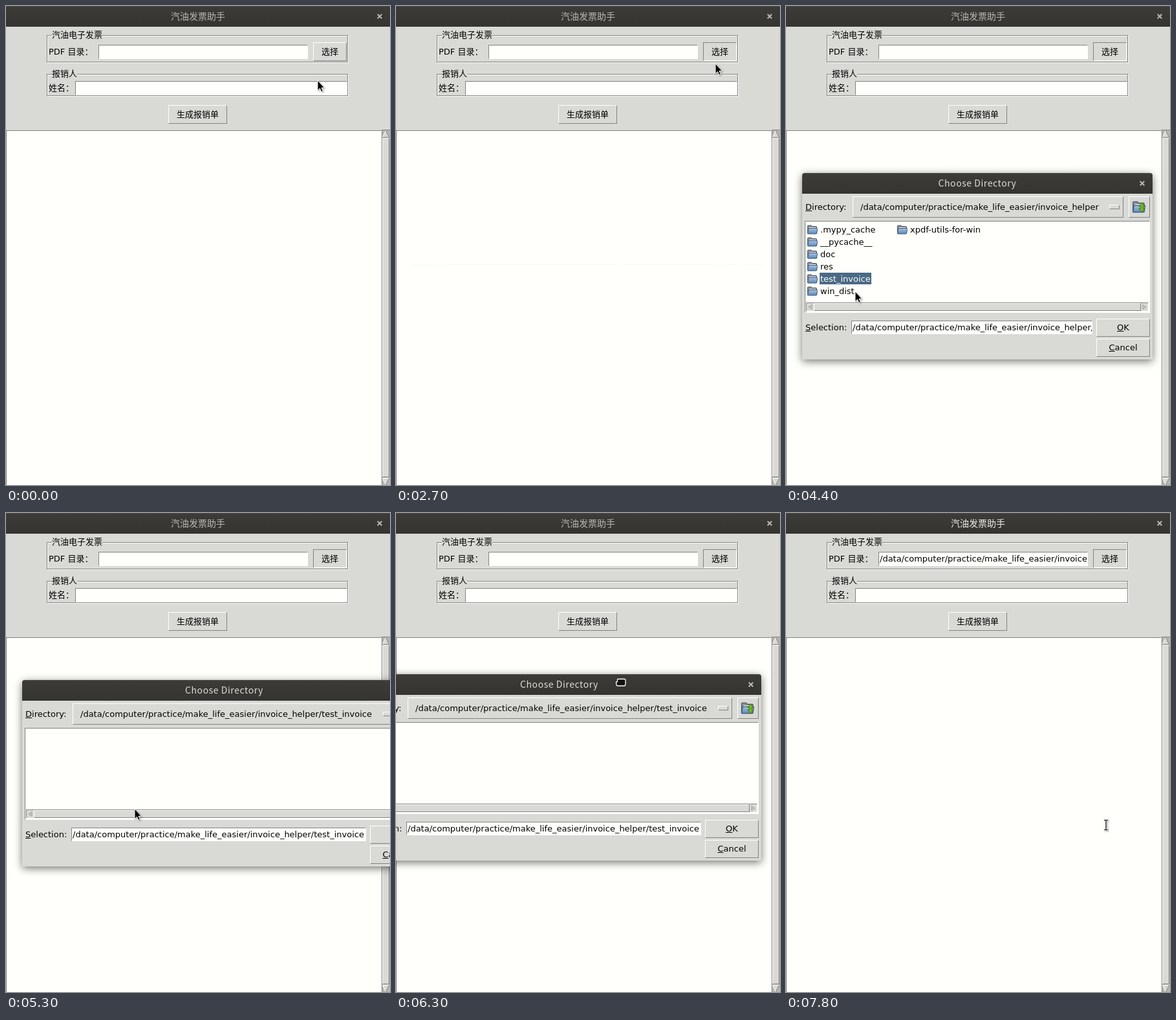
An HTML page for the animation above (8 s loop, 594 by 740 pixels).

```html
<!DOCTYPE html>
<html lang="zh">
<head>
<meta charset="utf-8">
<title>汽油发票助手</title>
<style>
:root { --face: #d9d9d5; --paper: #fffffb; --dark: #838380; --pick: #4a6984; }
html, body { margin: 0; width: 100%; height: 100%; overflow: hidden; }
body { position: relative; background: var(--face); color: #000;
  font: 13px/19px "DejaVu Sans", "Noto Sans CJK SC", "Noto Sans CJK", sans-serif; }
div, svg, .t { position: absolute; box-sizing: border-box; white-space: pre; }
svg { overflow: visible; }

/* widgets */
.bar { left: 0; right: 0; top: 0; height: 32px; text-align: center; color: #dfdcd5;
  font: 14px/30px "Noto Sans CJK SC", "Noto Sans CJK", "Noto Sans", sans-serif;
  background: linear-gradient(#4a4944, #3c3b37 2px, #353431); }
.bar svg { right: 12px; top: 12px; width: 8px; height: 8px; stroke: #b9b7b0; stroke-width: 2; }
.group { left: 63px; width: 466px; border: 1px solid var(--dark);
  box-shadow: 1px 1px #fff, inset 1px 1px #fff; }
.legend { left: 71px; background: var(--face); }
.raised { background: var(--face); border: 1px solid; border-color: #fff var(--dark) var(--dark) #fff; }
.sunken { background: var(--paper); border: 1px solid; border-color: var(--dark) #fff #fff var(--dark); overflow: hidden; }
.btn { text-align: center; line-height: 27px; }
.trough { background: #b5b5b1; border: 1px solid; border-color: var(--dark) #fff #fff var(--dark); }
.entry span { display: inline-block; height: 19px; padding: 0 1px; }

/* dialog */
#dialog { left: 25px; top: 258px; width: 542px; height: 288px; background: var(--face);
  border-radius: 4px 4px 0 0; box-shadow: 0 3px 13px rgba(0, 0, 0, .55); }
#dialog .bar { border-radius: 4px 4px 0 0; letter-spacing: .55px; }
.row { left: 8px; height: 19px; }
.row svg { left: 0; top: 2px; width: 16px; height: 15px; }
.row span { position: absolute; left: 19px; top: 0; padding: 0 1px; height: 18px; }

/* motion: every change is a hard step */
#main, .pick, .pathsel, .suffix, .files, #browse, #ok, #dialog, #field, #pointer, #pointer > svg {
  animation: 8s step-end infinite; }
#main { animation-name: focus; }
#field { animation-name: filled; }
#browse { animation-name: browse; }
#ok { animation-name: ok; }
#dialog { animation-name: dialog, widen; }
.pick { animation-name: pick; }
.pathsel { animation-name: pathsel; }
.suffix { animation-name: suffix; }
.files { animation-name: files; }
#pointer { animation-name: move; }
#pointer > .arrow { animation-name: arrow; }
#pointer > .grab { animation-name: grab; }
#pointer > .beam { animation-name: filled; }

@keyframes focus { 0% { color: #b9b7b0 } 95%, 100% { color: #efede8 } }
@keyframes filled { 0% { opacity: 0 } 95%, 100% { opacity: 1 } }
@keyframes browse {
  0% { background: #d9d9d5 }
  28.75% { background: #ececea }
  32.5% { background: #ececea; border-color: #838380 #fff #fff #838380 }
  33.75%, 100% { background: #d9d9d5 }
}
@keyframes ok { 0% { background: #d9d9d5 } 91.25%, 100% { background: #ececea } }
@keyframes pick { 0% { background: none; color: #000 } 55%, 100% { background: #4a6984; color: #fff } }
@keyframes pathsel { 0% { background: #4a6984; color: #fff } 55%, 100% { background: none; color: #000 } }
@keyframes suffix { 0% { opacity: 0 } 60%, 100% { opacity: 1 } }
@keyframes files { 0% { opacity: 1 } 60%, 100% { opacity: 0 } }
@keyframes widen { 0% { width: 542px } 60%, 100% { width: 625px } }
@keyframes dialog {
  0% { opacity: 0; transform: none }
  33.75% { opacity: .03; transform: scaleY(.02) }
  35% { opacity: .5; transform: scaleY(.55) }
  36.25% { opacity: 1; transform: none }
  76.25% { opacity: 1; transform: translate(-9px, 5px) }
  77.5% { opacity: 1; transform: translate(-45px, 0) }
  78.75% { opacity: 1; transform: translate(-85px, -9px) }
  80% { opacity: 1; transform: translate(-103px, -14px) }
  82.5% { opacity: 1; transform: translate(-105px, -15px) }
  95% { opacity: .03; transform: translate(-105px, -15px) scaleY(.017) }
  97.5%, 100% { opacity: 0; transform: none }
}
@keyframes arrow { 0% { opacity: 1 } 76.25% { opacity: 0 } 83.75% { opacity: 1 } 95%, 100% { opacity: 0 } }
@keyframes grab { 0% { opacity: 0 } 76.25% { opacity: 1 } 83.75%, 100% { opacity: 0 } }
@keyframes move {
  0% { transform: translate(473px, 95px) }
  6.25% { transform: translate(461px, 95px) }
  8.75% { transform: translate(447px, 92px) }
  10% { transform: translate(410px, 80px) }
  11.25% { transform: translate(360px, 62px) }
  12.5% { transform: translate(310px, 44px) }
  13.75% { transform: translate(265px, 30px) }
  15% { transform: translate(249px, 26px) }
  16.25% { transform: translate(262px, 24px) }
  17.5% { transform: translate(292px, 24px) }
  18.75% { transform: translate(319px, 25px) }
  21.25% { transform: translate(334px, 25px) }
  25% { transform: translate(365px, 32px) }
  26.25% { transform: translate(420px, 48px) }
  27.5% { transform: translate(470px, 63px) }
  28.75% { transform: translate(487px, 68px) }
  32.5% { transform: translate(485px, 69px) }
  40% { transform: translate(478px, 95px) }
  41.25% { transform: translate(445px, 150px) }
  42.5% { transform: translate(401px, 214px) }
  45% { transform: translate(358px, 436px) }
  47.5% { transform: translate(330px, 440px) }
  48.75% { transform: translate(270px, 446px) }
  50% { transform: translate(205px, 448px) }
  51.25% { transform: translate(150px, 444px) }
  52.5% { transform: translate(112px, 431px) }
  53.75% { transform: translate(98px, 421px) }
  65% { transform: translate(115px, 425px) }
  66.25% { transform: translate(190px, 437px) }
  67.5% { transform: translate(320px, 452px) }
  68.75% { transform: translate(500px, 457px) }
  70% { transform: translate(578px, 410px) }
  71.25% { transform: translate(515px, 325px) }
  72.5% { transform: translate(440px, 276px) }
  73.75% { transform: translate(434px, 267px) }
  75% { transform: translate(433px, 272px) }
  76.25% { transform: translate(424px, 277px) }
  77.5% { transform: translate(388px, 272px) }
  78.75% { transform: translate(348px, 263px) }
  80% { transform: translate(330px, 258px) }
  82.5% { transform: translate(328px, 257px) }
  86.25% { transform: translate(385px, 325px) }
  87.5% { transform: translate(478px, 441px) }
  90% { transform: translate(484px, 456px) }
  91.25% { transform: translate(488px, 472px) }
  92.5% { transform: translate(489px, 479px) }
  95%, 100% { transform: translate(494px, 482px) }
}
</style>
</head>
<body>
<svg width="0" height="0">
  <symbol id="x" viewBox="0 0 8 8"><path d="M.7.7 7.3 7.3M7.3.7.7 7.3"/></symbol>
  <linearGradient id="blue" x2="0" y2="1"><stop stop-color="#a9c4df"/><stop offset="1" stop-color="#5c86b3"/></linearGradient>
  <symbol id="folder" viewBox="0 0 16 15">
    <path d="M.5 13V2q0-1 1-1h4.5l1.2 1.5h6.3q1 0 1 1V13z" fill="#8a9099" stroke="#4d5660"/>
    <path d="M3 4h10v3H3z" fill="#e8ecef"/>
    <path d="M1 14q-.6 0-.5-1l1.2-6.5q.1-1 1-1h12q.9 0 .8 1L14.600 13q-.1 1-1 1z" fill="url(#blue)" stroke="#33587f"/>
  </symbol>
</svg>

<div class="bar" id="main">汽油发票助手<svg><use href="#x"/></svg></div>

<div class="group" style="top:45px;height:42px"></div>
<span class="t legend" style="top:35px">汽油电子发票</span>
<span class="t" style="left:66px;top:61px">PDF 目录：</span>
<div class="sunken" style="left:143px;top:60px;width:324px;height:22px"><span class="t" id="field" style="left:1px;top:0">/data/computer/practice/make_life_easier/invoice_helper/test_invoice</span></div>
<div class="raised btn" id="browse" style="left:475px;top:56px;width:52px;height:29px">选择</div>

<div class="group" style="top:105px;height:34px"></div>
<span class="t legend" style="top:95px">报销人</span>
<span class="t" style="left:66px;top:117px">姓名：</span>
<div class="sunken" style="left:107px;top:116px;width:421px;height:22px"></div>

<div class="raised btn" style="left:251px;top:153px;width:91px;height:29px">生成报销单</div>

<div class="sunken" style="left:0;top:192px;width:581px;height:550px"></div>
<div class="trough" style="left:581px;top:191px;width:14px;height:550px"></div>
<div class="raised" style="left:582px;top:204px;width:11px;height:524px"></div>
<svg style="left:582px;top:192px" width="11" height="548" fill="#d9d9d5">
  <path d="M5.500.5.5 11h10z"/><path d="M5.500.5.5 11" stroke="#fff"/><path d="M5.500.5l5 10.500H.5" fill="none" stroke="#838380"/>
  <path d="M5.500 548 .5 537.500h10z"/><path d="M5.500 548 .5 537.500h10" fill="none" stroke="#fff"/><path d="M10.500 537.500l-5 10.500" stroke="#838380"/>
</svg>

<div id="dialog">
  <div class="bar">Choose Directory<svg><use href="#x"/></svg></div>
  <span class="t" style="left:5px;top:43px"><u>D</u>irectory:</span>
  <div class="raised" style="left:78px;right:45px;top:36px;height:33px">
    <span class="t" style="left:11px;top:6px">/data/computer/practice/make_life_easier/invoice_helper<span class="suffix" style="display:inline-block">/test_invoice</span></span>
    <div class="raised" style="right:5px;top:12px;width:16px;height:7px"></div>
  </div>
  <div class="raised" style="right:4px;top:36px;width:33px;height:33px">
    <svg style="left:5px;top:5px" width="21" height="21"><use href="#folder" width="20" height="21"/>
      <path d="M10 9.500 14.500 4l4.500 5.500h-2.500v3h2.500L14.500 19 10 12.500h2.500v-3z" fill="#73b52c" stroke="#3f7a0d"/></svg>
  </div>

  <div class="sunken" style="left:4px;right:4px;top:74px;height:142px">
    <div style="left:1px;right:1px;bottom:1px;height:14px" class="trough">
      <div class="raised" style="left:11px;right:11px;top:0;bottom:0"></div>
      <div style="left:0;width:11px;top:0;bottom:0;background:var(--face)"><svg width="10" height="12"><path d="M8 2.500 3 6l5 3.500z" fill="#c5c5c1" stroke="#a3a39f"/></svg></div>
      <div style="right:0;width:11px;top:0;bottom:0;background:var(--face)"><svg width="10" height="12"><path d="M3 2.500 8 6 3 9.500z" fill="#c5c5c1" stroke="#a3a39f"/></svg></div>
    </div>
  </div>
  <div class="files" style="left:0;top:0">
    <div class="row" style="top:78px"><svg><use href="#folder"/></svg><span>.mypy_cache</span></div>
    <div class="row" style="top:97px"><svg><use href="#folder"/></svg><span>__pycache__</span></div>
    <div class="row" style="top:116px"><svg><use href="#folder"/></svg><span>doc</span></div>
    <div class="row" style="top:135px"><svg><use href="#folder"/></svg><span>res</span></div>
    <div class="row" style="top:154px"><svg><use href="#folder"/></svg><span class="pick">test_invoice</span></div>
    <div class="row" style="top:173px"><svg><use href="#folder"/></svg><span>win_dist</span></div>
    <div class="row" style="top:78px;left:147px"><svg><use href="#folder"/></svg><span>xpdf-utils-for-win</span></div>
  </div>

  <span class="t" style="left:5px;top:229px"><u>S</u>election:</span>
  <div class="sunken entry" style="left:76px;right:93px;top:228px;height:21px"><span class="pathsel">/data/computer/practice/make_life_easier/invoice_helper/test_invoice</span></div>
  <div class="raised btn" id="ok" style="right:4px;top:225px;width:83px;height:28px;line-height:26px"><u>O</u>K</div>
  <div class="raised btn" style="right:4px;top:256px;width:83px;height:28px;line-height:26px"><u>C</u>ancel</div>
</div>

<div id="pointer" style="left:0;top:0">
  <svg class="arrow" width="14" height="21" style="filter:drop-shadow(1px 1px 1px rgba(0,0,0,.4))">
    <path d="M1 1V16.500L4.500 13.300 6.800 18.600 9.300 17.500 7 12.300H11.500Z" fill="#000" stroke="#fff"/>
  </svg>
  <svg class="grab" width="18" height="16" style="left:-9px;top:-8px">
    <path d="M4.500 1.500H14q2 0 2 2V9q0 3-2 3H4q-1.500 0-2-1.500L1.500 7q0-1.500 2-1.500V2.500q0-1 1-1z" fill="#111" stroke="#fff" stroke-width="1.300"/>
  </svg>
  <svg class="beam" width="8" height="16" style="left:-3px;top:-8px;filter:drop-shadow(1px 1px 1px rgba(0,0,0,.4))" fill="none">
    <path d="M1 .5h6M1 15.500h6M4 .5v15" stroke="#fff" stroke-width="3"/>
    <path d="M1 .5h6M1 15.500h6M4 .5v15" stroke="#000" stroke-width="1.200"/>
  </svg>
</div>
</body>
</html>
```
